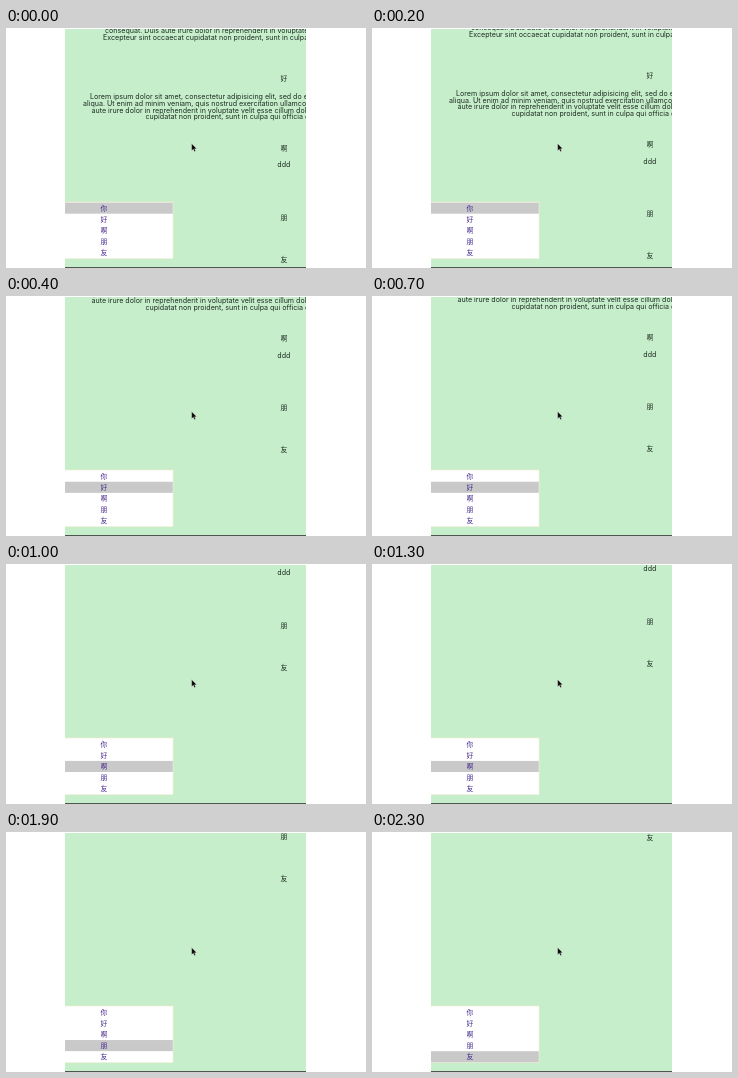
These frames come from a looping animation (360x240 px, 2.4 s). An HTML page:

```html
<!DOCTYPE html>
<html lang="en">
<head>
<meta charset="utf-8">
<title>Scroll menu</title>
<style>
  html, body { margin: 0; width: 100%; height: 100%; overflow: hidden; background: #fff; }
  svg { display: block; width: 360px; height: 240px; }
  .body { font: 7.1px Inter, sans-serif; fill: #1c2a20; white-space: pre; }
  .han { font: 6.8px "Noto Sans CJK SC", "Noto Sans CJK", sans-serif; text-anchor: middle; fill: #1c2a20; }
  .link { fill: #44288c; }
</style>
</head>
<body>
<svg viewBox="0 0 360 240">
  <defs><clipPath id="view"><rect x="59" y="1" width="241" height="238"/></clipPath></defs>
  <rect x="59" y="1" width="241" height="238" fill="#c6eecb"/>
  <g clip-path="url(#view)"><g id="page"></g></g>
  <rect x="59" y="239" width="241" height="1" fill="#4c554e"/>
  <rect x="59" y="173.5" width="108.5" height="57.5" fill="#e9eccf"/>
  <rect x="59" y="174.3" width="107.8" height="56" fill="#fff"/>
  <rect id="mark" x="59" width="107.8" height="11.1" fill="#c9c9c9"/>
  <g id="menu"></g>
  <path d="M185.6 115.6v7.2l1.7-1.5 1.1 2.4 1.3-.6-1.1-2.3h2.2z" fill="#0a0a0a" stroke="#fff" stroke-width=".5" stroke-opacity=".7"/>
</svg>
<script>
  const LOOP = 2400, STEP = 100, ROW = 11.15, MENU_TOP = 174.6;
  const page = document.getElementById('page');
  const menu = document.getElementById('menu');
  const mark = document.getElementById('mark');

  // text, left edge, baseline at scroll 0
  const lines = [
    ['consequat. Duis aute irure dolor in reprehenderit in voluptate velit', 99, 5.4],
    ['Excepteur sint occaecat cupidatat non proident, sunt in culpa qui', 97, 12],
    ['Lorem ipsum dolor sit amet, consectetur adipisicing elit, sed do eiusmod', 84, 71.2],
    ['aliqua. Ut enim ad minim veniam, quis nostrud exercitation ullamco', 77, 78],
    ['aute irure dolor in reprehenderit in voluptate velit esse cillum dolore', 85.5, 84.7],
    ['cupidatat non proident, sunt in culpa qui officia deserunt', 139.5, 91.4],
    ['ddd', 271.3, 139.4]
  ];
  // heading and its centre at scroll 0
  const heads = [['你', -60], ['好', 50.5], ['啊', 120], ['朋', 189.4], ['友', 231]];
  // wheel movements: time, scroll position
  const keys = [[0, 0], [100, 1], [200, 3.4], [300, 52], [400, 77.8], [600, 78.4], [700, 78.6],
    [800, 92], [900, 117], [1000, 128], [1200, 128], [1300, 132], [1400, 160], [1500, 184],
    [1700, 184.6], [2000, 184.6], [2100, 188], [2200, 211], [2300, 225.8], [2400, 225.8]];

  function addText(parent, cls, text, x, y) {
    const el = document.createElementNS('http://www.w3.org/2000/svg', 'text');
    el.setAttribute('class', cls);
    el.setAttribute('x', x);
    el.setAttribute('y', y);
    el.textContent = text;
    parent.appendChild(el);
  }

  function scrollAt(t) {
    const i = keys.findIndex(k => k[0] > t);
    const [t0, y0] = keys[i - 1], [t1, y1] = keys[i];
    return y0 + (y1 - y0) * (t - t0) / (t1 - t0);
  }

  function draw(ms) {
    const t = Math.floor(ms % LOOP / STEP) * STEP;
    const y = scrollAt(t);
    const active = heads.filter(h => h[1] - y < 20).length - 1;
    page.setAttribute('transform', `translate(0 ${-y})`);
    mark.setAttribute('y', MENU_TOP + active * ROW);
  }

  lines.forEach(([text, x, y]) => addText(page, 'body', text, x, y));
  heads.forEach(([text, y], i) => {
    addText(page, 'han', text, 278, y + 2.5);
    addText(menu, 'han link', text, 98, MENU_TOP + (i + .5) * ROW + 2.5);
  });

  const start = performance.now();
  function tick() {
    draw(performance.now() - start);
    requestAnimationFrame(tick);
  }
  tick();
</script>
</body>
</html>
```
